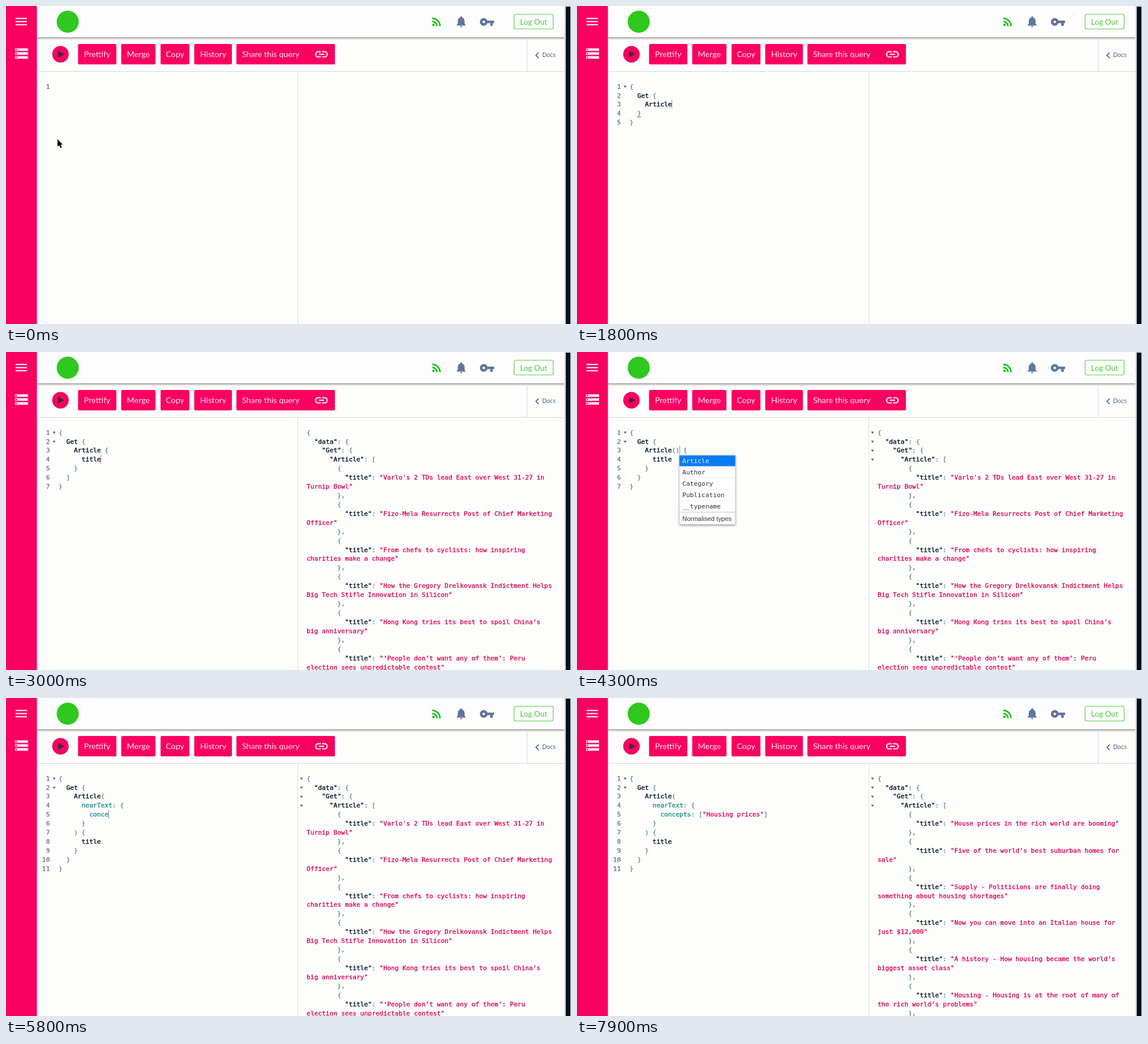
Animation, 998 px wide and 561 px high, one loop 8 s. Source, as an HTML page with a canvas:

```html
<!DOCTYPE html>
<html lang="en">
<head>
<meta charset="utf-8">
<title>Query console</title>
<style>
html, body { margin: 0; width: 100%; height: 100%; overflow: hidden; background: #fdfdfb; }
canvas { display: block; }
</style>
</head>
<body>
<canvas id="stage" width="998" height="561"></canvas>
<script>
const ctx = document.getElementById('stage').getContext('2d');
const LOOP = 8000, TICK = 100, BLINK = 530;
const CH = 6.77, LINE = 15.92, BASE = 145.6, LEFT = 93, RIGHT = 531, WRAP = 64;
const MONO = '11.25px "DejaVu Sans Mono", monospace';
const UI = 'Lato, "Open Sans", sans-serif';
const PINK = '#fa0060', NAVY = '#04162b', PUNCT = '#5f9490', ARG = '#219189',
      STR = '#d80c5c', SLATE = '#62759b', GREEN = '#2fc81e', PALE = '#ffeaf2', NUM = '#6d7f80';

// --- editor model: replay key presses into snapshots ---
const PAIRS = { '{': '}', '(': ')', '[': ']', '"': '"' };
const snaps = [{ at: 0, text: '', pos: 0 }];

function press({ text, pos }, key) {
  let head = text.slice(0, pos), tail = text.slice(pos);
  const start = head.lastIndexOf('\n') + 1;
  if (key === '<') return { text, pos: pos - 1 };
  if (key === '^') {
    const prev = text.lastIndexOf('\n', start - 2) + 1;
    return { text, pos: prev + pos - start };
  }
  if (key === ')' && tail[0] === ')') return { text, pos: pos + 1 };
  if (key === '\n') {
    const pad = head.slice(start).match(/^ */)[0];
    head += '\n' + pad + '  ';
    tail = '\n' + pad + tail;
  } else {
    head += key;
    tail = (PAIRS[key] || '') + tail;
  }
  return { text: head + tail, pos: head.length };
}

function type(keys, start, step) {
  [...keys].forEach((key, i) => {
    const next = press(snaps[snaps.length - 1], key);
    snaps.push({ at: start + i * step, ...next });
  });
}

type('{\nGet {\nArticle', 400, 95);
type(' {\ntitle', 1900, 95);
type('^', 3600, 0);
type('()', 4100, 100);
type('<\n', 4400, 50);
type('nearText', 4510, 55);
type(': {\nconcepts: ["Housin', 5090, 80);
type('g prices', 6860, 66);

// --- result model ---
function wrap(line) {
  const rows = [];
  while (line.length > WRAP) {
    const cut = line.lastIndexOf(' ', WRAP);
    rows.push(line.slice(0, cut));
    line = line.slice(cut + 1);
  }
  return [...rows, line];
}

function results(titles) {
  const rows = ['{', '  "data": {', '    "Get": {', '      "Article": ['];
  for (const title of titles) {
    rows.push('        {', ...wrap(`          "title": "${title}"`), '        },');
  }
  return rows.join('\n');
}

const allNews = results([
  "Varlo's 2 TDs lead East over West 31-27 in Turnip Bowl",
  'Fizo-Mela Resurrects Post of Chief Marketing Officer',
  'From chefs to cyclists: how inspiring charities make a change',
  'How the Gregory Drelkovansk Indictment Helps Big Tech Stifle Innovation in Silicon',
  'Hong Kong tries its best to spoil China’s big anniversary',
  '‘People don’t want any of them’: Peru election sees unpredictable contest'
]);
const housingNews = results([
  'House prices in the rich world are booming',
  'Five of the world’s best suburban homes for sale',
  'Supply - Politicians are finally doing something about housing shortages',
  'Now you can move into an Italian house for just $12,000',
  'A history - How housing became the world’s biggest asset class',
  'Housing - Housing is at the root of many of the rich world’s problems'
]);

// --- drawing helpers ---
function rect(x, y, w, h, color) {
  ctx.fillStyle = color;
  ctx.fillRect(x, y, w, h);
}

function box(x, y, w, h, r, color) {
  ctx.fillStyle = color;
  ctx.beginPath();
  ctx.roundRect(x, y, w, h, r);
  ctx.fill();
}

function disc(x, y, r, color) {
  ctx.fillStyle = color;
  ctx.beginPath();
  ctx.arc(x, y, r, 0, Math.PI * 2);
  ctx.fill();
}

function poly(points, color) {
  ctx.fillStyle = color;
  ctx.beginPath();
  points.forEach(([x, y]) => ctx.lineTo(x, y));
  ctx.closePath();
  ctx.fill();
}

function label(str, x, y, font, color, align = 'left') {
  ctx.font = font;
  ctx.fillStyle = color;
  ctx.textAlign = align;
  ctx.fillText(str, x, y);
}

// Code text, thickened slightly to a medium weight.
function code(str, x, y, color, align) {
  label(str, x, y, MONO, color, align);
  ctx.strokeStyle = color;
  ctx.lineWidth = 0.4;
  ctx.strokeText(str, x, y);
}

function icon(path, x, y, scale, color) {
  ctx.save();
  ctx.translate(x, y);
  ctx.scale(scale, scale);
  ctx.fillStyle = color;
  ctx.fill(new Path2D(path));
  ctx.restore();
}

function fade(x0, y0, x1, y1, from, to) {
  const g = ctx.createLinearGradient(x0, y0, x1, y1);
  g.addColorStop(0, from);
  g.addColorStop(1, to);
  return g;
}

const KEY = 'M12.65 10C11.83 7.67 9.61 6 7 6c-3.31 0-6 2.69-6 6s2.69 6 6 6c2.61 0 4.83-1.67 5.65-4H17v4h4v-4h2v-4H12.65zM7 14c-1.1 0-2-.9-2-2s.9-2 2-2 2 .9 2 2-.9 2-2 2z';
const BELL = 'M12 22c1.1 0 2-.9 2-2h-4c0 1.1.9 2 2 2zm6-6v-5c0-3.07-1.64-5.64-4.5-6.32V4c0-.83-.67-1.5-1.5-1.5s-1.5.67-1.5 1.5v.68C7.63 5.36 6 7.92 6 11v5l-2 2v1h16v-1l-2-2z';
const LINK = 'M3.9 12c0-1.71 1.39-3.1 3.1-3.1h4V7H7c-2.76 0-5 2.24-5 5s2.24 5 5 5h4v-1.9H7c-1.71 0-3.1-1.39-3.1-3.1zM8 13h8v-2H8v2zm9-6h-4v1.9h4c1.71 0 3.1 1.39 3.1 3.1s-1.39 3.1-3.1 3.1h-4V17h4c2.76 0 5-2.24 5-5s-2.24-5-5-5z';

// --- page chrome ---
function drawHeader() {
  rect(55, 55, 933, 5, fade(0, 55, 0, 60, 'rgba(0,0,0,.36)', 'rgba(0,0,0,0)'));
  rect(55, 0, 933, 55, '#fdfdfd');
  disc(109, 27.7, 19.5, GREEN);

  disc(755.2, 33.3, 2.2, '#16c314');
  ctx.strokeStyle = '#16c314';
  ctx.lineWidth = 2.7;
  for (const r of [8.2, 13.6]) {
    ctx.beginPath();
    ctx.arc(753, 35.5, r, -Math.PI / 2, 0);
    ctx.stroke();
  }
  icon(BELL, 792, 15.6, 1, SLATE);
  icon(KEY, 835.9, 14.4, 1.14, SLATE);

  ctx.strokeStyle = '#5dd04d';
  ctx.lineWidth = 1.2;
  ctx.beginPath();
  ctx.roundRect(897.5, 14.5, 69, 26, 3);
  ctx.stroke();
  label('Log Out', 932, 33, '13.6px ' + UI, '#4cc83c', 'center');
}

function drawToolbar() {
  disc(96.2, 85.1, 14.6, '#cc0c54');
  disc(96.2, 85, 13.8, PINK);
  poly([[92, 79], [103.2, 85], [92, 91]], '#40283a');

  const buttons = [['Prettify', 127.3, 195, 161], ['Merge', 203.5, 264, 233.8],
    ['Copy', 273, 324, 298.5], ['History', 332.5, 399, 366], ['Share this query', 407, 581, 467.6]];
  for (const [name, x, end, mid] of buttons) {
    box(x, 67, end - x, 36, 2, PINK);
    label(name, mid, 90.2, '14.3px ' + UI, PALE, 'center');
  }
  icon(LINK, 543.6, 71.6, 1.13, PALE);

  rect(920, 56, 1, 60, '#d8d8e8');
  rect(55, 115, 933, 1, '#d5d5e8');
  ctx.strokeStyle = '#40507c';
  ctx.lineWidth = 1.5;
  ctx.beginPath();
  ctx.moveTo(941, 82);
  ctx.lineTo(936, 87);
  ctx.lineTo(941, 92);
  ctx.stroke();
  label('Docs', 947, 90.3, '10.7px ' + UI, '#53618a');
}

function drawFrame() {
  rect(0, 0, 998, 561, '#fdfdfb');
  drawHeader();
  drawToolbar();
  rect(515, 116, 1, 445, '#dededa');
  rect(0, 0, 54.6, 561, PINK);
  for (const y of [20.9, 26.4, 31.9]) rect(17, y, 20, 2.2, PALE);
  for (const y of [74.6, 81.5, 88.4]) {
    rect(16, y, 23, 4.6, PALE);
    rect(17.2, y + 1.15, 2.3, 2.3, PINK);
  }
  rect(986, 0, 3, 561, fade(986, 0, 989, 0, '#f4f4f4', '#a8adb3'));
  rect(989, 1, 8, 560, '#01101f');
}

// --- code panes ---
const lineY = row => BASE + row * LINE;

function drawTokens(text, x, colorOf) {
  let row = 0, start = 0;
  for (const m of text.matchAll(/"[^"]*"|\w+|\n|[^\s\w"]/g)) {
    const token = m[0];
    if (token === '\n') {
      row++;
      start = m.index + 1;
      continue;
    }
    const color = colorOf(token, text[m.index + token.length]);
    token.split('\n').forEach((part, i) => {
      if (i) {
        row++;
        start = m.index + token.lastIndexOf('\n') + 1;
      }
      const col = i ? 0 : m.index - start;
      code(part, x + col * CH, lineY(row), color);
    });
  }
}

function fold(x, row) {
  const y = lineY(row) - 5;
  poly([[x - 2.6, y], [x + 2.6, y], [x, y + 4]], '#5c6868');
}

function squiggle(row, col) {
  const x = LEFT + col * CH, y = lineY(row) + 2.6;
  ctx.strokeStyle = '#e0405c';
  ctx.lineWidth = 1;
  ctx.beginPath();
  for (let i = 0; i <= 4; i++) ctx.lineTo(x + i * 1.7, y + (i % 2 ? -1 : 1));
  ctx.stroke();
}

function drawQuery(t) {
  const snap = snaps.filter(s => s.at <= t).pop();
  const rows = snap.text.split('\n').length;
  for (let i = 0; i < rows; i++) code(i + 1, 77.4, lineY(i), NUM, 'right');

  let depth = 0;
  drawTokens(snap.text, LEFT, token => {
    if (token === '(') depth++;
    if (token === ')') depth--;
    if (token[0] === '"') return STR;
    if (/\w/.test(token)) return depth ? ARG : NAVY;
    return PUNCT;
  });

  if (t >= 1000) fold(85, 0);
  if (t >= 2300) fold(85, 1);
  if (t >= 1500 && t < 1900) squiggle(3, 2);
  if (t >= 4700 && t < 5100) squiggle(4, 6);

  if (snap.at && (t - snap.at) % (2 * BLINK) < BLINK) {
    const before = snap.text.slice(0, snap.pos).split('\n');
    const col = before[before.length - 1].length;
    rect(Math.round(LEFT + col * CH - 0.4), lineY(before.length - 1) - 12, 1, 15.5, '#8a8f8f');
  }
}

function drawResult(t) {
  if (t < 2800) return;
  drawTokens(t < 7700 ? allNews : housingNews, RIGHT, (token, next) =>
    token[0] !== '"' ? PUNCT : next === ':' ? NAVY : STR);
  if (t >= 3300) for (let i = 0; i < 4; i++) fold(522, i);
}

function drawHints() {
  ctx.save();
  ctx.shadowColor = 'rgba(0,0,0,.4)';
  ctx.shadowBlur = 4;
  ctx.shadowOffsetY = 1;
  rect(180.5, 182, 99.5, 122.5, '#b5b5b5');
  ctx.restore();
  rect(181, 182.5, 98.5, 121.5, '#fefefe');
  rect(181, 182.5, 98.5, 19, '#087cf2');
  ['Article', 'Author', 'Category', 'Publication', '__typename'].forEach((name, i) => {
    if (i > 1) rect(181, 181.5 + i * 20.2, 98.5, 1, '#f0f0f3');
    label(name, 186, 195.5 + i * 20.2, MONO, i ? '#2b3037' : '#e6f3ff');
  });
  rect(181, 282, 98.5, 1, '#c4c4c4');
  label('Normalised types', 186, 298, '11.3px "Liberation Sans", Arial, sans-serif', '#30343a');
}

function drawPointer() {
  const shape = [[0, 0], [0, 13], [3, 10.4], [5.2, 15.4], [7.6, 14.4], [5.4, 9.6], [9.2, 9.6]]
    .map(([x, y]) => [91 + x, 235 + y]);
  poly(shape, '#000');
  ctx.strokeStyle = '#fff';
  ctx.lineWidth = 1.2;
  ctx.stroke();
  poly(shape, '#000');
}

let origin = null;
function render(now) {
  if (origin === null) origin = now;
  const t = Math.floor(((now - origin) % LOOP) / TICK) * TICK;
  drawFrame();
  drawQuery(t);
  drawResult(t);
  if (t >= 4200 && t < 4400) drawHints();
  if (t < 400) drawPointer();
  requestAnimationFrame(render);
}
requestAnimationFrame(render);
</script>
</body>
</html>
```
